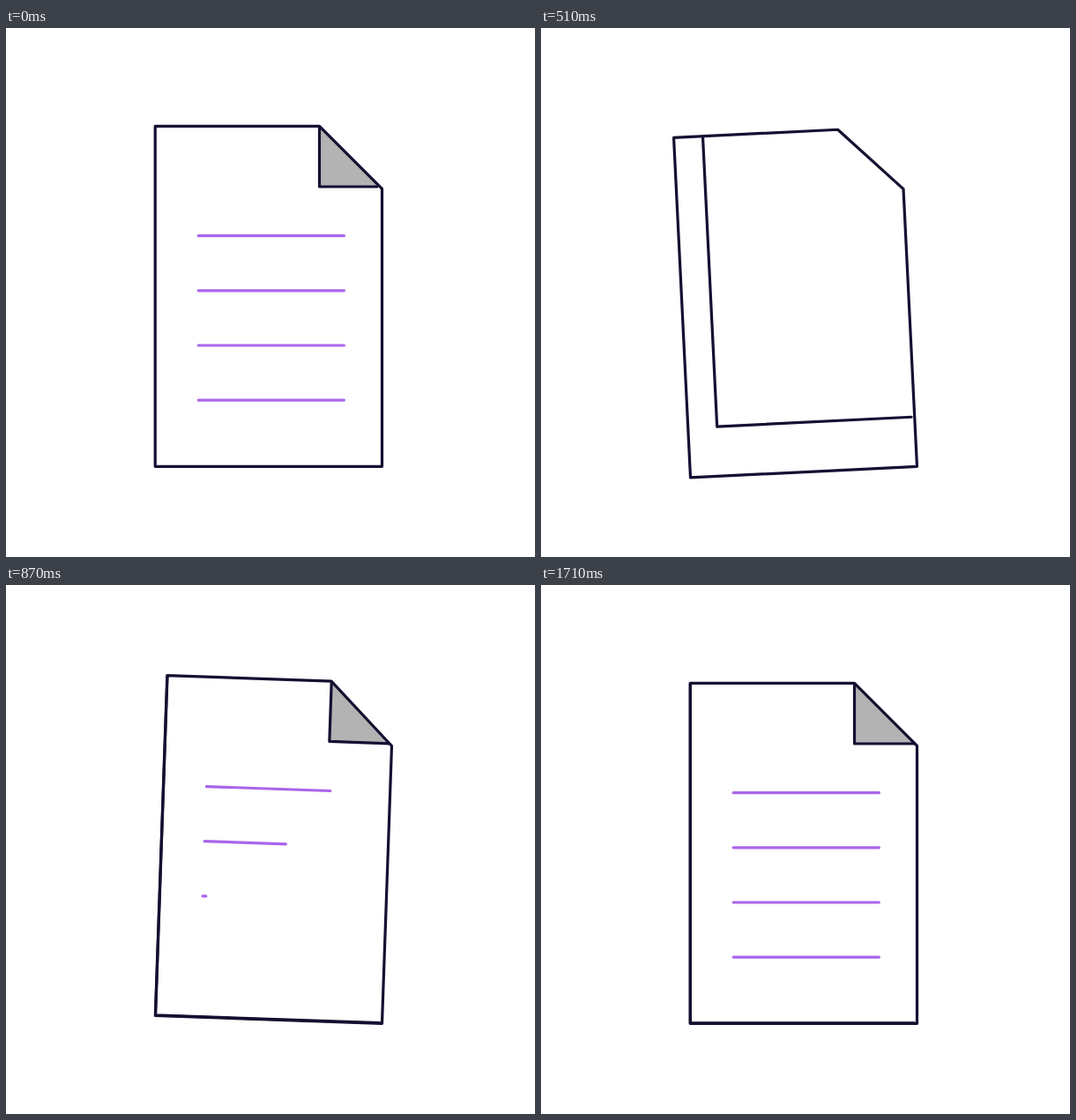
An HTML page that plays this animation: 600 by 600 pixels, repeating every 4.4 s.

```html
<!DOCTYPE html>
<html lang="en">
<head>
<meta charset="utf-8">
<title>Turning page</title>
<style>
  html, body { margin: 0; width: 100%; height: 100%; overflow: hidden; background: #fff; }
  svg { display: block; width: 100%; height: 100%; }
  path { fill: none; stroke-width: 3.2; stroke-linecap: round; stroke-linejoin: round; }
  .ink { stroke: #150f31; }
  .rule { stroke: #a965ea; }
  .white { fill: #fff; }
  .grey { fill: #b3b3b3; }
</style>
</head>
<body>
<svg viewBox="0 0 600 600">
  <g id="sheet">
    <g id="oldRules"></g>
    <path id="nextPage" class="white"/>
    <path id="peelBack" class="grey"/>
    <path id="peelEdge" class="ink"/>
    <path id="fold" class="ink grey"/>
    <g id="newRules"></g>
    <path class="ink" d="M169.2 111.3H355.5L426.5 182.3V497.3H169.2Z"/>
  </g>
</svg>
<script>
const LOOP = 4400, STEP = 30, LAST = 57;
const RULES = [235.7, 297.8, 360, 422.1];
const LEFT = 218.2, RIGHT = 383.4, TOP = 111.3;
const TILT = [[0, 0], [7.7, 7], [18, -3], [29, 2], [38, 0]];
const el = id => document.getElementById(id);
const mix = (a, b, p) => a + (b - a) * p;

// Cubic Bezier easing with control points (x1, 0) and (x2, 1).
function bezier(x1, x2) {
  return t => {
    if (t <= 0) return 0;
    if (t >= 1) return 1;
    let lo = 0, hi = 1;
    for (let i = 0; i < 24; i++) {
      const u = (lo + hi) / 2, v = 1 - u;
      if (3 * u * v * v * x1 + 3 * u * u * v * x2 + u ** 3 < t) lo = u; else hi = u;
    }
    return lo * lo * (3 - 2 * lo);
  };
}
const swing = bezier(.42, .58);
const settle = bezier(.36, 0);

function addRules(group) {
  return RULES.map(y => {
    const path = document.createElementNS("http://www.w3.org/2000/svg", "path");
    path.setAttribute("class", "rule");
    path.setAttribute("d", `M${LEFT} ${y}H${RIGHT}`);
    return group.appendChild(path);
  });
}
addRules(el("oldRules"));
const newRules = addRules(el("newRules"));

function tiltAt(step) {
  for (let i = 1; i < TILT.length; i++) {
    const [s0, a0] = TILT[i - 1], [s1, a1] = TILT[i];
    if (step < s1) return mix(a0, a1, swing((step - s0) / (s1 - s0)));
  }
  return 0;
}

function drawPeel(p) {
  const x = mix(355.5, 169.4, p), y = mix(180, 496.8, p), end = mix(420.6, 423.4, p);
  el("nextPage").setAttribute("d", `M${x} ${TOP}V${y}H426.5V182.3L355.5 ${TOP}Z`);
  el("peelBack").setAttribute("d", `M${x} ${TOP}V${y}H${mix(424, 426, p)}Z`);
  el("peelBack").style.opacity = Math.max(0, 1 - p / .5);
  el("peelEdge").setAttribute("d", `M${x} ${TOP + 1}V${y}H${end}`);
}

function drawFold(p) {
  const x = mix(384, 355.5, p), y = mix(140, 180, p);
  el("fold").setAttribute("d", `M${x} ${mix(140, 112, p)}V${y}H${mix(384, 423.6, p)}`);
  el("fold").style.display = p > 0 ? "" : "none";
}

function draw(step) {
  el("sheet").setAttribute("transform", `rotate(${tiltAt(step)} 426.5 497.3)`);
  drawPeel(settle((step - 8) / 20));
  drawFold(settle((step - 17) / 14));
  newRules.forEach((rule, i) => {
    const p = settle((step - 17 - 5 * i) / 25);
    rule.style.display = p > 0 ? "" : "none";
    rule.setAttribute("d", `M${LEFT} ${RULES[i]}H${mix(LEFT, RIGHT, p)}`);
  });
}

const start = performance.now();
function tick() {
  const time = (performance.now() - start) % LOOP;
  draw(Math.min(LAST, Math.floor(time / STEP)));
  requestAnimationFrame(tick);
}
tick();
</script>
</body>
</html>
```
